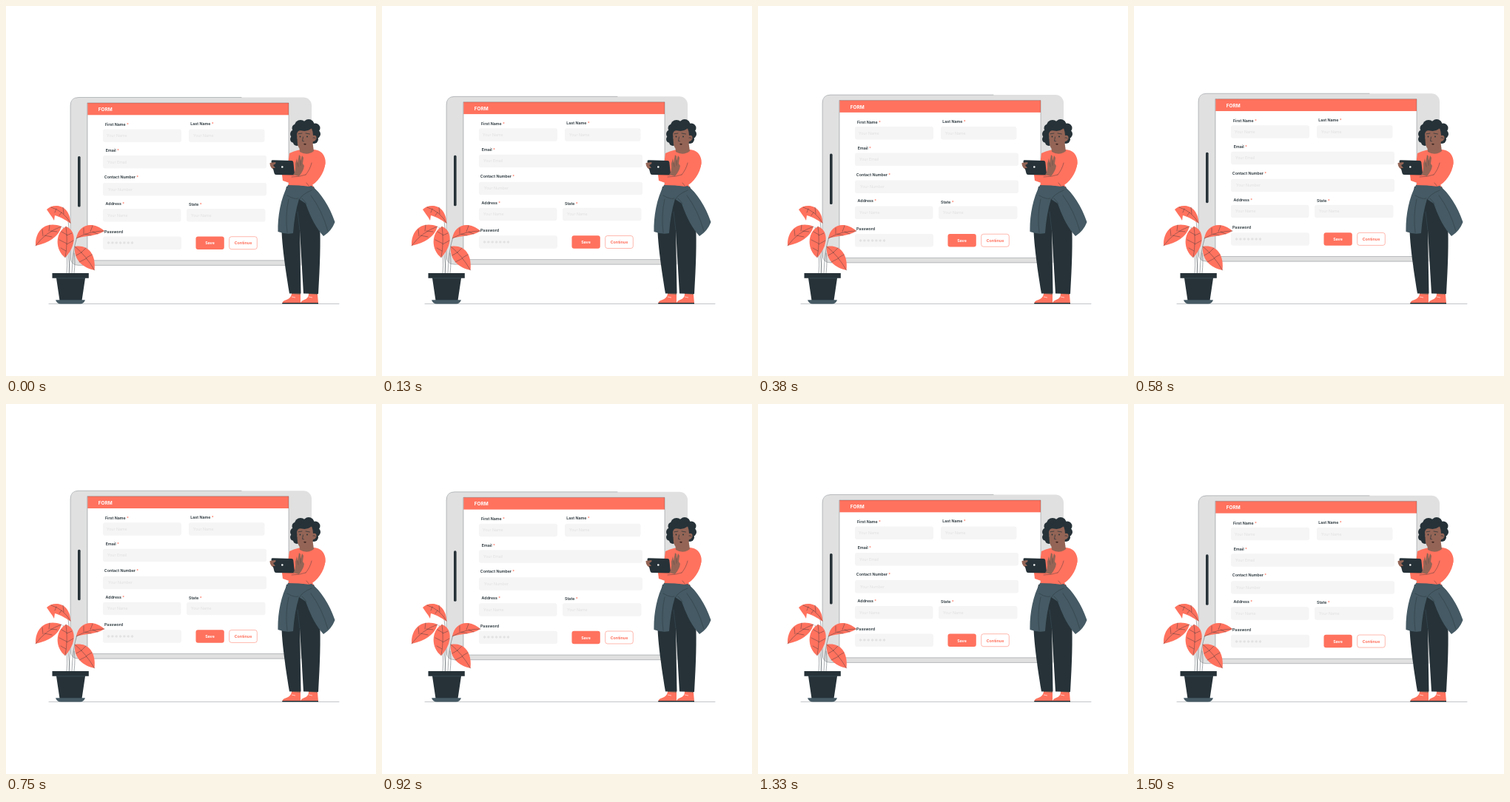
An HTML page that plays this animation: 500x500 px, repeating every 1540 ms.

```html
<!DOCTYPE html>
<html lang="en">
<head>
<meta charset="utf-8">
<title>Form on a tablet</title>
<style>
  html, body { margin: 0; width: 100%; height: 100%; overflow: hidden; background: #fff; }
  svg { display: block; width: 100vw; height: 100vh; }
  text { font: 600 5.3px Inter, sans-serif; fill: #263238; }
  .hint { font-weight: 400; fill: #e0e0e0; }
  .star, .coral { fill: #ff725e; }
  .white { fill: #fff; }
  .bold { font-weight: 700; }
  .mid { text-anchor: middle; }
  .dark { fill: #263238; }
  .slate { fill: #455a64; }
  .skin { fill: #946556; }
  .line { fill: none; stroke: #263238; stroke-width: .4; stroke-linecap: round; stroke-linejoin: round; }
  .thin { stroke-width: .28; }
</style>
</head>
<body>
<svg viewBox="0 0 500 500">
  <path class="line thin" d="M58 402.500H450"/>

  <g id="tablet">
    <rect x="87" y="123.500" width="326" height="227" rx="11" fill="#e0e0e0"/>
    <path class="line thin" d="M318 123.500H98Q87 123.500 87 135V339Q87 350.400 98 350.400H378"/>
    <rect class="white" x="110.300" y="131" width="271.700" height="212.800"/>
    <rect class="coral" x="110.300" y="131" width="271.700" height="16.300"/>
    <path class="line thin" d="M110.300 131H382V343.800H110.300Z"/>
    <rect class="dark" x="97" y="203" width="3.600" height="68.500" rx="1.600"/>
    <text class="white bold" x="124.800" y="142" style="font-size:6.4px">FORM</text>
    <g id="fields"></g>
    <text class="hint" x="136" y="325.200" style="font-size:9.5px;font-weight:700">*******</text>
    <rect class="coral" x="256.500" y="311.500" width="38.300" height="17.500" rx="3"/>
    <text class="white bold mid" x="275.500" y="322.500">Save</text>
    <rect x="301.700" y="311.700" width="37.600" height="17" rx="3" fill="#fff" stroke="#ff725e" stroke-width=".5"/>
    <text class="coral bold mid" x="320.500" y="322.500">Continue</text>
  </g>

  <g id="plant">
    <path class="line" d="M82 361Q84 340 80 322M86 361Q86 335 77 299M89 361Q90 330 96 312M92 361Q94 345 92 334M85 361Q88 320 84 290"/>
    <g class="coral">
      <path d="M55 275C63 267 86 266 87.500 294C79 288 73 285 66 283L65 290C62 284 58 280 55 275Z"/>
      <path d="M40 324C39 303 54 290 75 298C71 312 58 320 40 324Z"/>
      <path d="M81 298C95 303 96 323 80 340C66 330 66 306 81 298Z"/>
      <path d="M95 314C98 295 117 290 133 304C123 311 108 310 95 314Z"/>
      <path d="M93 325C109 322 122 333 119.500 357C104 354 91 343 93 325Z"/>
    </g>
    <path class="line" d="M61 272Q78 277 87 293M68 274L66 279M75 279L72 283M77 272L78 281
      M40 324Q54 305 75 298M50 311L49 302M58 304L59 296M52 310L62 312M60 304L69 305
      M81 298Q84 318 80 340M82 309L75 305M82 310L89 307M82 321L72 316M82 322L91 317M81 331L74 327
      M95 314Q112 304 133 304M105 308L105 300M114 305L117 297M107 308L115 310M117 305L124 308
      M93 325Q108 337 119.500 357M102 333L108 327M109 340L116 336M102 333L95 337M109 341L99 346"/>
    <path class="dark" d="M62.500 361H111.800V367.700H107L102.500 398H72.500L68 367.700H62.500Z"/>
    <path d="M68 367.900H107" stroke="#455a64" stroke-width=".6"/>
    <path class="slate" d="M67 397.200H107Q105 402.500 100 402.500H74Q69 402.500 67 397.200Z"/>
  </g>

  <g id="woman">
    <path class="skin" d="M386 386H398V393H386ZM409 386H421V393H409Z"/>
    <path class="coral" d="M386 389L398 390V402H373.500Q373 398.500 379 397Q385 395 386 389ZM409 389L421 390L422 402H398Q398 399 403 397Q409 395 409 389Z"/>
    <path class="dark" d="M373.300 401H398V402.500H373.300ZM398 401H422V402.500H398Z"/>
    <path d="M386 393L391 394M409 393L414 394" stroke="#fff" stroke-width=".6"/>
    <path class="dark" d="M379 244H416C425 270 427 310 422 389L402 388.500L397 303L398.500 388.500H383C376 345 370 305 373 275Z"/>
    <path class="line" d="M397 303L394 278" style="stroke:#455a64"/>

    <path class="coral" d="M383 199Q398 192 416 194Q429 195 431.500 208C433 219 424 230 412 236L416 246H380Q386 232 381 214Z"/>
    <path class="skin" d="M396 187L414 182L416 196Q407 203 397 197Z"/>
    <g class="dark">
      <circle cx="398" cy="162" r="8"/><circle cx="409" cy="160.500" r="7.500"/>
      <circle cx="418" cy="165" r="6.500"/><circle cx="419" cy="173" r="6"/>
      <circle cx="416" cy="180" r="6"/><circle cx="392" cy="165" r="5.500"/>
      <circle cx="390" cy="173" r="6"/><circle cx="389" cy="180" r="5"/>
      <circle cx="393" cy="184" r="5"/><circle cx="406" cy="170" r="11"/>
    </g>
    <path class="skin" d="M393 173Q394 167 400 168.500Q407 170 413 165.500Q415 170 415 175Q420 174 419.500 179Q418 183 415 183Q414 194 405 195.500Q396 196 394 187Z"/>
    <path class="line" d="M395 172.800L400 172M405 172L410.500 173M401.500 177L400.500 182.500L402.500 182.800M415 178Q417 177 418 179" style="stroke-width:.7"/>
    <circle class="dark" cx="397.500" cy="176.500" r=".9"/><circle class="dark" cx="407" cy="176.500" r=".9"/>
    <path d="M402 186.500Q404 184.800 406 186.800Q404 189 402 186.500Z" fill="#3f2522"/>

    <path class="slate" d="M381 242L413 243C425 252 437 270 444.500 292Q440 304 429 311Q415 296 405 267L396 261Q390 280 388 307Q379 309 367.500 305C367 285 371 260 381 242Z"/>
    <path class="line" d="M396 262Q400 254 413 249M380 256Q390 262 395 260M382 261Q377 283 380 306M406 267Q402 262 400 260M412 256Q427 276 435 304"/>
    <path class="coral" d="M419 204Q431.500 202 431.500 213C430 226 421 239 410 244Q389 242 374 236L373 228L389 227L405 228Q413 214 419 204Z"/>
    <path class="line" d="M405 228Q411 221 413 212M386 231Q397 231 405 228M410 244L406 239"/>

    <path class="skin" d="M356.500 213Q361 209 366 212L370 222L363 222Q357 219 356.500 213Z"/>
    <path class="dark" d="M360 208.300L386 209Q388 209 388.300 211L390 227Q390 228.500 388.500 228.500L365 228Q363 228 362.500 226L358.500 210Q358.500 208.300 360 208.300Z"/>
    <circle class="white" cx="373.300" cy="217.500" r="1.300"/>
    <path class="skin" d="M356.500 212L364 211Q366 213 361 215L364 219L359 219Z"/>
    <path class="skin" d="M391 213L393 206L394 212L396 201L398 203L398 209L400 202L402 205L401 213L403 216Q402 223 396 230L388 228Q392 224 391 213Z"/>
    <path class="line thin" d="M394 212L395 217M398 209L398 215"/>
  </g>
</svg>
<script>
  const LOOP = 1540, TOP_TIME = 720, TRAVEL = 7;

  // label, label x, label baseline, box x, box y, box width, hint, hint x
  const fields = [
    ["First Name", 134, 162.2, 131, 166.5, 106, "Your Name", 136],
    ["Last Name", 249.3, 161.2, 247, 166.5, 102.5, "Your Name", 253],
    ["Email", 134.8, 197.4, 131, 202, 221, "Your Email", 137],
    ["Contact Number", 132.8, 233, 131, 239, 221, "Your Number", 138],
    ["Address", 134.6, 268.9, 131, 274, 105.5, "Your Name", 137],
    ["State", 247, 270, 244, 274, 106.5, "Your Name", 250],
    ["Password", 133, 306.6, 131, 311.5, 106, "", 136]
  ];

  document.getElementById("fields").innerHTML = fields.map(
    ([label, x, y, boxX, boxY, width, hint, hintX]) => `
      <rect x="${boxX}" y="${boxY}" width="${width}" height="17.5" rx="3" fill="#f5f5f5"/>
      <text x="${x}" y="${y}">${label}${hint && ' <tspan class="star">*</tspan>'}</text>
      <text class="hint" x="${hintX}" y="${boxY + 10.7}">${hint}</text>`
  ).join("");

  const tablet = document.getElementById("tablet");
  // Triangle wave: 0 at the highest point, TRAVEL at the lowest.
  const drop = t => TRAVEL * (1 - Math.abs(1 - 2 * ((t - TOP_TIME + LOOP) % LOOP) / LOOP));

  function draw() {
    const y = drop(performance.now() % LOOP) - drop(0);
    tablet.setAttribute("transform", `translate(0 ${y.toFixed(3)})`);
    requestAnimationFrame(draw);
  }
  draw();
</script>
</body>
</html>
```
